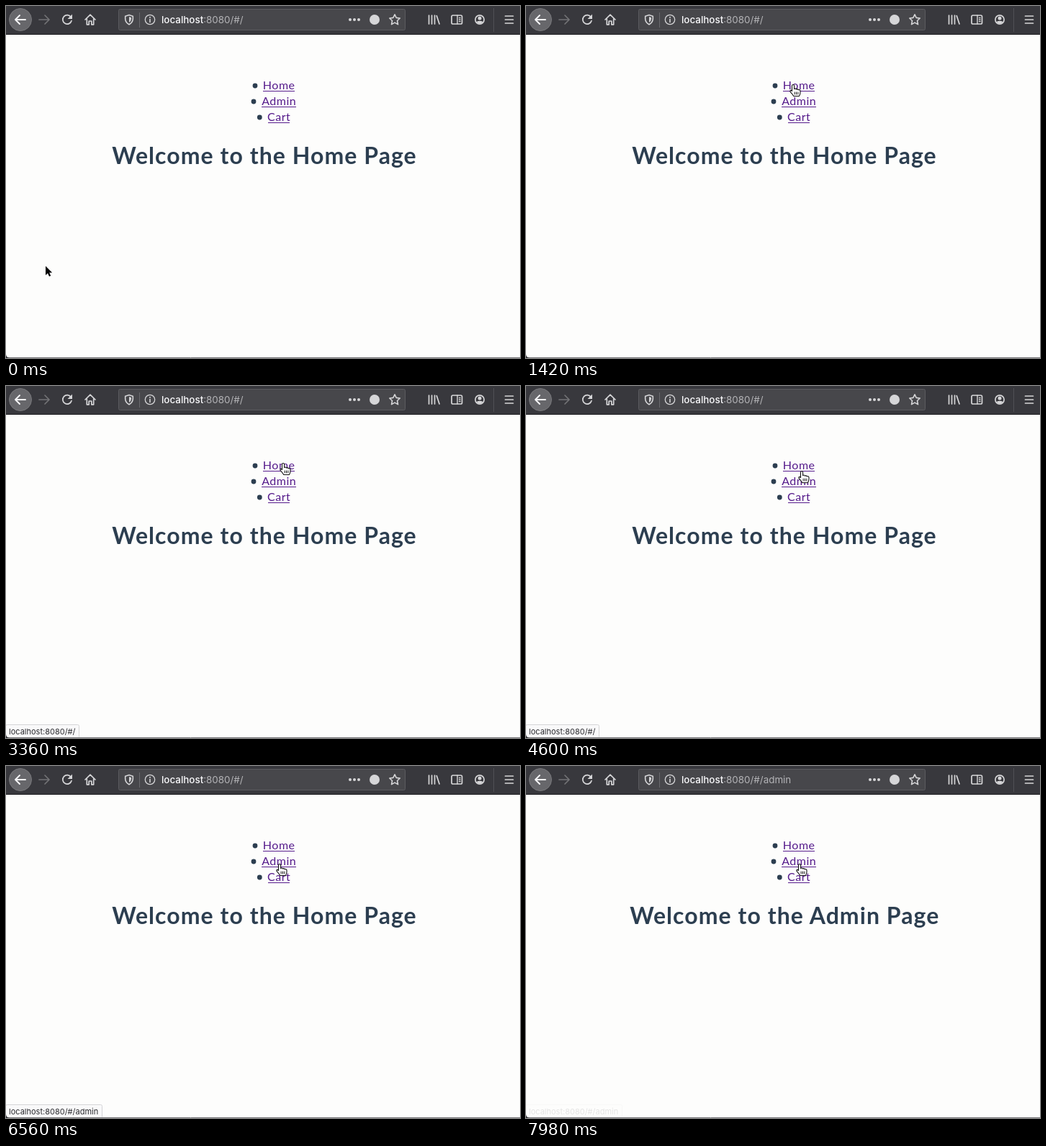
An HTML page for the animation above (8000 ms loop, 714x490 px).

```html
<!DOCTYPE html>
<html lang="en">
<head>
<meta charset="utf-8">
<title>Router navigation</title>
<style>
  html, body { margin: 0; width: 100%; height: 100%; overflow: hidden; background: #fdfdfc; }
  svg { display: block; width: 714px; height: 490px; }

  .icon { fill: none; stroke: #d6d6d8; stroke-width: 1.7; stroke-linecap: round; stroke-linejoin: round; }
  .solid { fill: #d6d6d8; stroke: none; }
  .dim { stroke: #727275; }
  .url { font: 13.4px Inter, sans-serif; fill: #b4b4b7; }
  .url .host { fill: #fafafc; font-weight: 500; }
  .link { font: 16px Lato, sans-serif; letter-spacing: .5px; text-anchor: middle; fill: #551a8b; stroke: none; }
  .rule { stroke: #551a8b; stroke-width: 1; }
  .bullet { fill: #2c3e50; }
  .title { font: 700 32px Lato, sans-serif; letter-spacing: 1.06px; text-anchor: middle; fill: #2c3e50; }
  .status rect { fill: #f9f9fa; stroke: #d4d4d6; }
  .status text { font: 11px Inter, sans-serif; fill: #2a2a2e; }

  .cursor, .arrow, .hand, .home, .admin, .status, .toHome, .toAdmin, .press { animation: 8s infinite linear; }
  .cursor { animation-name: travel; }
  .arrow { animation-name: arrow; }
  .hand { animation-name: hand; }
  .home { animation-name: leave; }
  .admin { animation-name: enter; }
  .status { animation-name: status; }
  .toHome { animation-name: toHome; }
  .toAdmin { animation-name: toAdmin; }
  .press { animation-name: press; }
  .arrow, .hand, .home, .admin, .toHome, .toAdmin, .press { animation-timing-function: step-end; }

  @keyframes travel {
    0%, .25% { transform: translate(55px, 362px); animation-timing-function: ease-in-out; }
    10.25% { transform: translate(372px, 112px); animation-timing-function: ease-in-out; }
    17.75%, 21% { transform: translate(371px, 109px); animation-timing-function: ease-in-out; }
    29%, 52% { transform: translate(385px, 107px); animation-timing-function: ease-in-out; }
    57.5% { transform: translate(383px, 118px); animation-timing-function: ease-out; }
    62.5%, 100% { transform: translate(380px, 136px); }
  }
  @keyframes arrow { 0% { opacity: 1 } 9.5%, 100% { opacity: 0 } }
  @keyframes hand { 0% { opacity: 0 } 9.5%, 100% { opacity: 1 } }
  @keyframes leave { 0% { opacity: 1 } 95%, 100% { opacity: 0 } }
  @keyframes enter { 0% { opacity: 0 } 95%, 100% { opacity: 1 } }
  @keyframes status {
    0%, 39.5% { opacity: 0 }
    42%, 97.75% { opacity: 1 }
    99.75%, 100% { opacity: .12 }
  }
  @keyframes toHome { 0% { opacity: 1 } 58.75%, 100% { opacity: 0 } }
  @keyframes toAdmin { 0% { opacity: 0 } 58.75%, 100% { opacity: 1 } }
  @keyframes press {
    0% { fill: #551a8b; stroke: #551a8b }
    92% { fill: #e02020; stroke: #e02020 }
    95%, 100% { fill: #551a8b; stroke: #551a8b }
  }
  .press .link { fill: inherit; }
  .press .rule { stroke: inherit; }
</style>
</head>
<body>
<svg viewBox="0 0 714 490">
  <rect width="714" height="490" fill="#fdfdfc"/>

  <!-- Browser toolbar -->
  <rect width="714" height="40" fill="#38383d"/>
  <path d="M0 39.5H714" stroke="#1a1a1d"/>
  <circle cx="20" cy="19" r="15.5" fill="#67676b" stroke="#78787b"/>
  <path d="M677.5 3V36" stroke="#515155"/>
  <rect x="156.5" y="4.5" width="398" height="29" rx="2" fill="#47474b" stroke="#5b5b5f"/>
  <path d="M185.5 9V30" stroke="#6a6a6e"/>

  <g class="icon">
    <path d="M27 19H13M19 13L13 19L19 25" stroke="#f4f4f6" stroke-width="2"/>
    <path class="dim" d="M46 19H60M54 13L60 19L54 25"/>
    <path d="M90.2 15.5A6.2 6.2 0 1 0 91 20.5"/>
    <path class="solid" d="M92 11.5V18H85.5Z"/>
    <path d="M110 19L117 12.2L124 19M112.3 18V25.8H115.2V21H118.8V25.8H121.7V18"/>
    <path d="M171 12.5L176.3 14.3V18Q176 23 171 25.8Q166 23 165.7 18V14.3Z" stroke-width="1.6"/>
    <path class="solid" d="M171 15L174 16V18Q174 21 171 23Z"/>
    <circle cx="200" cy="19" r="6.7" stroke-width="1.3"/>
    <path d="M200 18.6V22.4" stroke-width="1.6"/>
    <circle class="solid" cx="200" cy="15.8" r="1"/>
    <circle class="solid" cx="478" cy="19" r="2"/>
    <circle class="solid" cx="484" cy="19" r="2"/>
    <circle class="solid" cx="490" cy="19" r="2"/>
    <circle class="solid" cx="512" cy="19" r="7"/>
    <path d="M540 11.8L542.2 16.4L547.2 17L543.5 20.5L544.5 25.6L540 23.1L535.5 25.6L536.5 20.5L532.8 17L537.8 16.4Z" stroke-width="1.6"/>
    <path d="M587.5 13V25M591.5 13V25M595.5 13V25M598.2 13.5L602 25"/>
    <rect x="619" y="13" width="14.5" height="12" rx="1.8"/>
    <path d="M627 13V25M629.5 16.5H631M629.5 19H631M629.5 21.5H631" stroke-width="1.4"/>
    <circle cx="658" cy="19" r="6.1"/>
    <circle class="solid" cx="658" cy="17" r="2.5"/>
    <path class="solid" d="M653.5 22Q658 19.5 662.5 22Q658 27 653.5 22Z"/>
    <path d="M693.5 14H704.5M693.5 19H704.5M693.5 24H704.5"/>
  </g>

  <text class="url home" x="216" y="24"><tspan class="host">localhost</tspan>:8080/#/</text>
  <text class="url admin" x="216" y="24"><tspan class="host">localhost</tspan>:8080/#/admin</text>

  <!-- Page -->
  <g class="bullet">
    <circle cx="346" cy="111" r="3.4"/>
    <circle cx="344" cy="133" r="3.4"/>
    <circle cx="352.3" cy="155" r="3.4"/>
  </g>
  <text class="link" x="379.2" y="116">Home</text>
  <path class="rule" d="M357 118.5H401"/>
  <g class="press">
    <text class="link" x="379.2" y="138">Admin</text>
    <path class="rule" d="M355 140.5H403"/>
  </g>
  <text class="link" x="379.2" y="160">Cart</text>
  <path class="rule" d="M364 162.5H394"/>

  <text class="title home" x="359" y="219.5">Welcome to the Home Page</text>
  <text class="title admin" x="359.3" y="219.5">Welcome to the Admin Page</text>

  <!-- Link preview -->
  <g class="status">
    <g class="toHome">
      <rect x="-.5" y="471.5" width="102" height="19" rx="2"/>
      <text x="4" y="485">localhost:8080/#/</text>
    </g>
    <g class="toAdmin">
      <rect x="-.5" y="471.5" width="134" height="19" rx="2"/>
      <text x="4" y="485">localhost:8080/#/admin</text>
    </g>
  </g>

  <!-- Window edge -->
  <path d="M0 489.5H714" stroke="#77777a"/>
  <path d="M0 485Q.5 489.5 5 490H0Z" fill="#26262a"/>

  <g class="cursor" stroke-linejoin="round">
    <path class="arrow" d="M0 0V12.8L3 10L5 14.6L7.2 13.6L5.2 9.2H9.2Z" fill="#000" stroke="#fff" stroke-width="1.4" paint-order="stroke"/>
    <g class="hand" stroke="#111" stroke-width="1.1" stroke-linecap="round">
      <path d="M-1.5 9.5V2A1.5 1.5 0 0 1 1.6 2V6.5Q3.2 5.3 4.4 6.9Q6 6 7.1 7.6Q9.7 7 10 9.2V11.2Q10 14 8.4 16.5H.8Q-.8 13.8 -3.8 10.7Q-4.6 8.5 -3 8.4Q-2.2 8.4 -1.5 9.5Z" fill="#fff"/>
      <path d="M2.2 11V14M4.5 11V14M6.8 11V14" stroke-width="1"/>
    </g>
  </g>
</svg>
</body>
</html>
```
